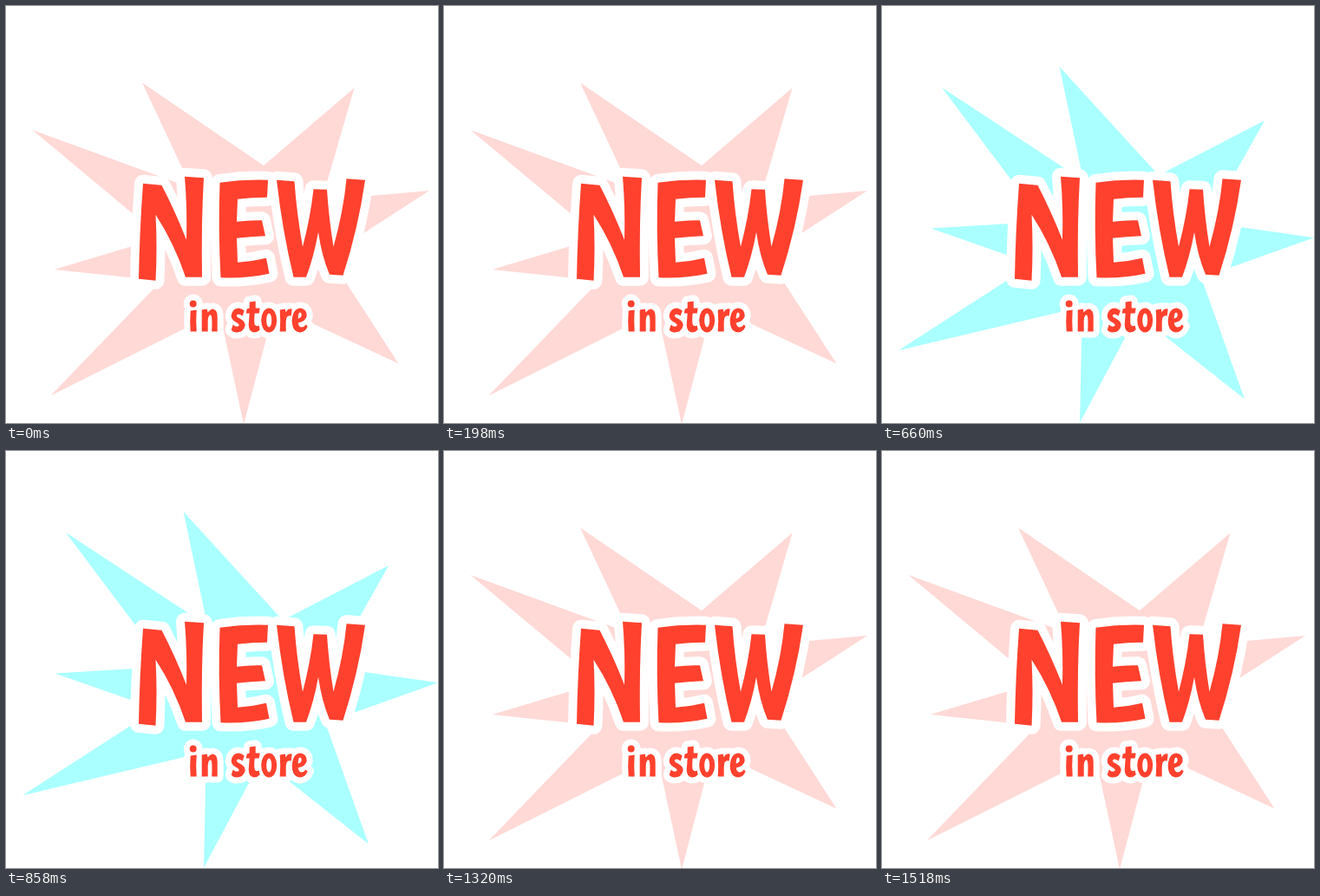
Write an HTML page that moves like this. It is 498 by 481 pixels and loops after 1650 ms.

```html
<!DOCTYPE html>
<html lang="en">
<head>
<meta charset="utf-8">
<title>New in store</title>
<style>
  html, body { margin: 0; width: 100%; height: 100%; overflow: hidden; background: #fff; }
  svg { display: block; width: 498px; height: 481px; }
  .halo { fill: #fff; stroke: #fff; stroke-linejoin: round; }
  .ink { fill: #ff412e; fill-rule: evenodd; }
</style>
</head>
<body>
<svg viewBox="0 0 498 481" role="img" aria-label="NEW in store">
  <defs>
    <path id="headline" transform="translate(0 -1.2)" d="
      M158 206 L179.5 208 Q195 238 208 271 Q209 233 206 198 L228 199.5 Q225 250 226 314
      L207 314 Q194 275 172.5 242 Q174.5 280 172.5 318 L153 316 Q154 260 158 206Z
      M246.5 205 Q274 201 302 202 L301 222 Q283 222 267 224 L266 250 Q281 248 295 248.5
      L299 266.5 Q282 267 266 269 L267 297 Q284 296 300 292 L303.5 310 Q276 316 247.5 314.5
      Q244.5 260 246.5 205Z
      M312 202 L332.5 203.5 Q335 240 342 279 Q351 245 354.5 212.5 L370 213 Q372 245 377.5 279
      Q389 238 392.5 200.5 L414 202 Q406 258 388.5 312 L373 311 Q364 290 360 262
      Q355 290 346 314 L331.5 314 Q318.5 260 312 202Z"/>
    <path id="subline" transform="translate(-.3 -1.5)" d="
      M213 353 L220 352 Q219 365 220 377 L213 377 Q212 365 213 353Z
      M212 345 a4 4 0 1 0 8 0 a4 4 0 1 0 -8 0Z
      M226 352 L232 351 L233 355 Q236 351 239 351 Q244 352 244 360 L244 377 L237.5 377
      Q238 367 237.5 361 Q237 357 235 358 Q233 360 233 364 L233 377 L226 377Z
      M275 353 L273 359 Q267 355 266 359 Q267 361 270 362 Q276 365 276 370
      Q274 378 266 378 Q262 378 260 375 L262 369 Q266 373 269 370 Q269 368 265 366
      Q260 363 260 359 Q261 350 269 350 Q273 351 275 353Z
      M281 343 L288 342 L288 350 L293 350 L292 356 L287 356 Q286 364 287 369
      Q289 372 292 370 L293 375 Q290 378 286 378 Q280 377 280 369 L281 356
      L277 356 L278 351 L281 350Z
      M294.5 364 a9 14 0 1 0 18 0 a9 14 0 1 0 -18 0Z
      M300.5 364 a3 8 0 1 0 6 0 a3 8 0 1 0 -6 0Z
      M316 352 L322 351 L323 355 Q325 350 330 351 L329 359 Q323 357 323 366 L323 377
      L316 377 Q317 365 316 352Z
      M348 371 Q345 378 339 378 Q330 377 330 364 Q331 350 340 350 Q347 351 347 359
      Q346 365 337 367 Q338 372 341 372 Q344 372 346 369Z
      M337 362 Q341 361 341 358 Q341 355 339 355 Q337 356 337 362Z"/>
  </defs>
  <polygon id="burst" points="
    30.5,143 214,210 157,88.5 297,184 401.5,94.5 364,224 488,213 372,288
    452.5,412.5 310,346 274,482.5 246,352 51.5,449.5 179,317 55.5,304 179,267"/>
  <g class="halo">
    <use href="#headline" stroke-width="20"/>
    <use href="#subline" stroke-width="14"/>
  </g>
  <g class="ink">
    <use href="#headline"/>
    <use href="#subline"/>
  </g>
</svg>
<script>
  const HOLD = 330;
  const PINK = { angle: 0, color: '#ffd9d6' };
  const LIME = { angle: 7.3, color: '#f3ffaa' };
  const AQUA = { angle: 13.26, color: '#aaffff' };
  const steps = [PINK, LIME, AQUA, LIME, PINK];
  const burst = document.getElementById('burst');

  function draw() {
    const { angle, color } = steps[Math.floor(performance.now() / HOLD) % steps.length];
    burst.setAttribute('transform', `rotate(${angle} 260 284)`);
    burst.setAttribute('fill', color);
    requestAnimationFrame(draw);
  }
  draw();
</script>
</body>
</html>
```
